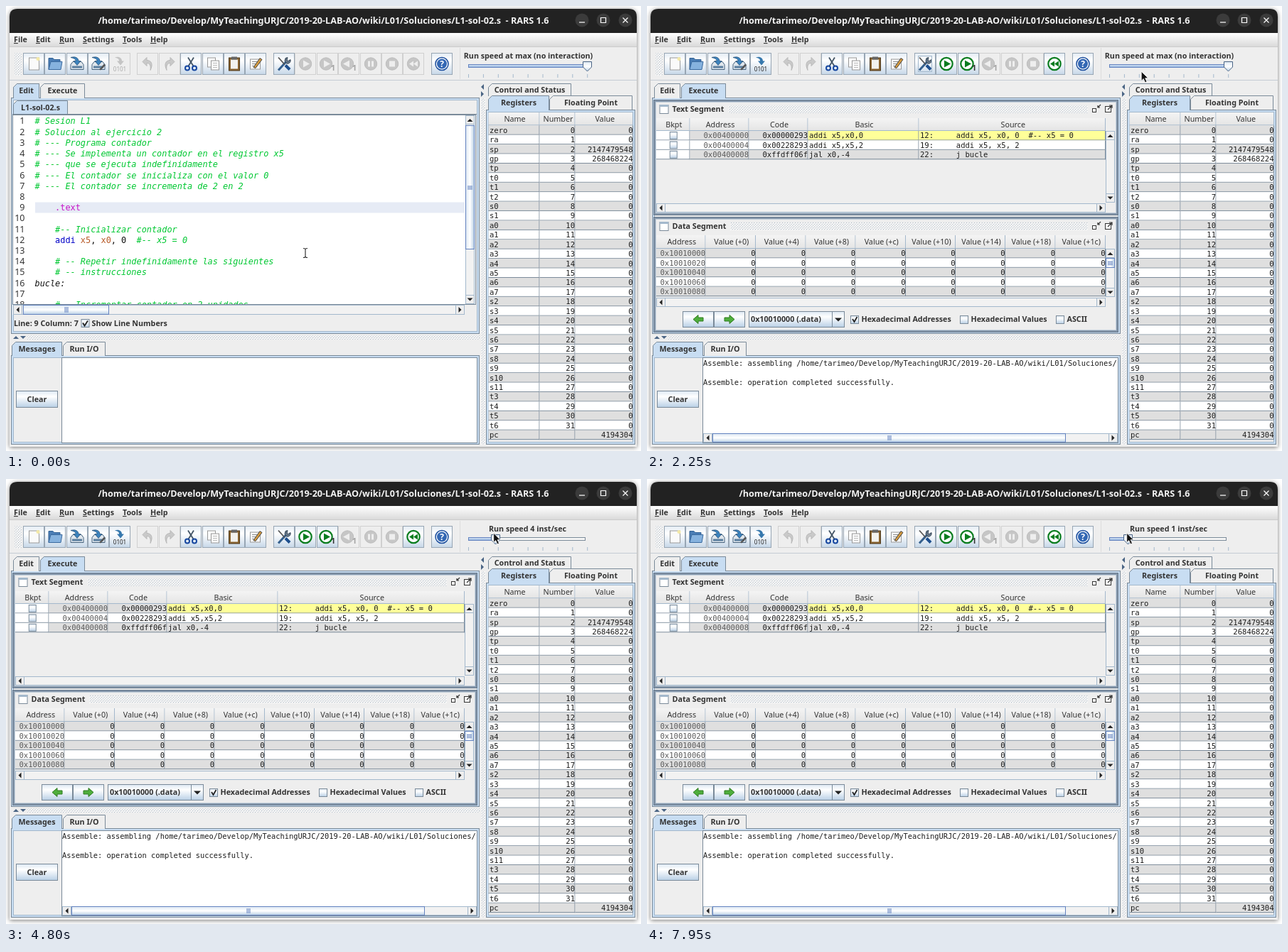
An HTML page that plays this animation: 893x627 px, repeating every 8 s.

```html
<!DOCTYPE html>
<html lang="es">
<head>
<meta charset="utf-8">
<title>RARS</title>
<style>
html, body { margin: 0; width: 100%; height: 100%; overflow: hidden; background: #fff; }
svg { display: block; width: 893px; height: 627px; }
text { font: bold 10.73px "Noto Sans", "Open Sans", sans-serif; fill: #333; white-space: pre; }
.plain { font-weight: normal; }
.mono { font: 10.4px "DejaVu Sans Mono", monospace; fill: #1c1c1c; }
.cell { font-size: 10.55px; }
.dim { fill: #5a5a5a; }
.code { font: italic 11.89px "DejaVu Sans Mono", monospace; fill: #00c832; }
.num { font: 12.5px "Noto Sans", sans-serif; fill: #333; }
.title { font-size: 12.6px; fill: #f4f4f4; }
.mid { text-anchor: middle; }
.end { text-anchor: end; }
.key { text-decoration: underline; }
.kw { fill: #0000c8; font-style: normal; }
.reg { fill: #b85a28; font-style: normal; }
.dir { fill: #c814c8; font-style: normal; }
.blk { fill: #111; }
.up { font-style: normal; }
</style>
</head>
<body>
<svg id="stage" viewBox="0 0 893 627"></svg>
<script>
const LINE = '#7a8a99', SOFT = '#a3b8cc', BLUE = '#c8ddf2', BG = '#eee', GREY = '#dfdfdf';
const stage = document.getElementById('stage');

// Drawing helpers
const box = (x, y, w, h, fill, stroke) => {
  const d = stroke ? .5 : 0;
  return `<rect x="${x + d}" y="${y + d}" width="${w - 2 * d}" height="${h - 2 * d}" fill="${fill}" stroke="${stroke || 'none'}"/>`;
};
const text = (x, y, s, cls = '') => `<text x="${x}" y="${y}" class="${cls}">${s}</text>`;
const path = (d, fill = 'none', stroke = 'none', w = 1) =>
  `<path d="${d}" fill="${fill}" stroke="${stroke}" stroke-width="${w}"/>`;
const circle = (x, y, r, fill, stroke = 'none', w = 1) =>
  `<circle cx="${x}" cy="${y}" r="${r}" fill="${fill}" stroke="${stroke}" stroke-width="${w}"/>`;
const at = (x, y, s, extra = '') => `<g transform="translate(${x} ${y})${extra}">${s}</g>`;
const group = (id, s) => `<g id="${id}">${s}</g>`;
const arrow = (x, y, turn, r = 4, fill = '#222') =>
  at(x, y, path(`M${-r} ${-r / 2}H${r}L0 ${r / 2}Z`, fill), ` rotate(${turn})`);
const bumps = (x, y, w, h) => box(x, y, w, h, 'url(#bump)');
const frame = (x, y, w, h) => box(x, y, w, h, BLUE, LINE) + box(x + 3, y + 3, w - 6, h - 6, BG, SOFT);
const tab = (x, y, w, h, label, on) =>
  path(`M${x + .5} ${y + h}V${y + 5.5}L${x + 5.5} ${y + .5}H${x + w - .5}V${y + h}`, on ? BLUE : BG, LINE) +
  text(x + w / 2, Math.floor(y + h / 2) + 4, label, 'mid');

// Scroll bar with an optional thumb from a to b
function scroll(x, y, w, h, a, b) {
  const up = h > w, s = 13;
  let out = box(x, y, w, h, '#f2f2f2', SOFT);
  out += up
    ? box(x, y, w, s, BG, SOFT) + box(x, y + h - s, w, s, BG, SOFT) +
      arrow(x + w / 2, y + 7, 180) + arrow(x + w / 2, y + h - 6.5, 0)
    : box(x, y, s, h, BG, SOFT) + box(x + w - s, y, s, h, BG, SOFT) +
      arrow(x + 6.5, y + h / 2, 90) + arrow(x + w - 6.5, y + h / 2, -90);
  if (b) {
    out += up ? box(x, a, w, b - a, 'url(#thumbV)', '#6382bf') : box(a, y, b - a, h, 'url(#thumbH)', '#6382bf');
    const m = (a + b) / 2;
    for (const k of [-2, 0, 2])
      out += up ? box(x + 3, m + k, w - 6, 1, '#6382bf') : box(m + k, y + 3, 1, h - 6, '#6382bf');
  }
  return out;
}

// Table: cols are the column edges, fill picks a cell colour, align is l, r, d (dim, right) or c per column
function table(cols, heads, top, first, rows, align, fill) {
  const pitch = 13.42;
  let out = '';
  heads.forEach((s, i) => {
    const w = cols[i + 1] - cols[i];
    out += box(cols[i], top, w, first - top, 'url(#head)') + box(cols[i + 1] - 1, top, 1, first - top, SOFT) +
      text(cols[i] + w / 2 + 1, Math.floor((top + first) / 2) + 4, s, 'plain mid');
  });
  out += box(cols[0], first - 1, cols[heads.length] - cols[0], 1, SOFT);
  rows.forEach((row, r) => row.forEach((s, i) => {
    const y = first + r * pitch, w = cols[i + 1] - cols[i];
    out += box(cols[i], y, w, pitch, fill(r, i)) + box(cols[i], y + pitch - 1, w, 1, LINE) +
      box(cols[i + 1] - 1, y, 1, pitch, LINE);
    if (align[i] == 'c') out += box(cols[i] + w / 2 - 5, y + 1, 11, 11, 'url(#btn)', LINE);
    else if (align[i] == 'l') out += text(cols[i] + 1.5, y + 10.4, s, 'mono cell');
    else out += text(cols[i + 1] - .5, y + 10.4, s, 'mono cell end' + (align[i] == 'd' ? ' dim' : ''));
  }));
  return out;
}
const stripe = r => r % 2 ? '#fff' : GREY;
const check = (x, on, label) =>
  box(x, 436, 12, 12, 'url(#btn)', LINE) + (on ? path(`M${x + 3} 441l2.5 4 4-7`, 'none', '#222', 1.8) : '') +
  text(x + 15.5, 445, label);

// Toolbar icons, centred on 0,0
const sheet = (x, y, w, h) => box(x, y, w, h, '#fafafa', '#999');
const disk = c => path('M-9 1L-6 -3H6L9 1V8H-9Z', '#dfe6ec', '#44617c') + box(-7, 3, 14, 3, '#5b7f9f') +
  path('M-9 -9C-2 -11 2 -8 2 -4H5L0 2L-5 -4H-2C-2 -7 -5 -8 -9 -9Z', c, '#234a70', .7);
const dump = on => path('M-7 -9C-1 -11 3 -8 3 -4H6L1 2L-4 -4H-1C-1 -7 -3 -8 -7 -9Z', on ? '#3678ad' : '#c4c4c4') +
  `<text y="10" class="mid plain" style="font-size:8px;fill:${on ? '#222' : '#aaa'}">0101</text>`;
const turn = path('M-7 -3L-1 -9V-5C6 -5 8 1 4 9C5 2 3 -1 -1 -1V3Z', '#c9c9c9', '#b8b8b8');
const disc = (on, glyph, one) => {
  const c = on ? '#0a7d1f' : '#bdbdbd', x = one ? -2 : 0;
  return circle(x, 0, 8.7, on ? '#fff' : '#c6c6c6', c, on ? 2.2 : 1) + at(x, 0, path(glyph, on ? c : '#eee')) +
    (one ? `<text x="8" y="9.5" class="mid" fill-opacity="${on ? 1 : .4}">1</text>` : '');
};
const play = 'M-3 -5L6 0L-3 5Z', back = 'M3 -5L-6 0L3 5Z', rewind = 'M0 -4V4L-6 0ZM6 -4V4L0 0Z';
const icons = on => [
  [39, 1, sheet(-7, -9, 15, 18) + circle(6, -7, 2.5, '#f3e9a8')],
  [69, 1, path('M-9 -8H-3L-1 -6H7V8H-9Z', '#4a7db5', '#2f5f93') + path('M-6 -3H10L8 8H-9Z', '#86b2de', '#3a6a9f')],
  [100, 1, disk('#3c83bd')],
  [130, 1, disk('#3c83bd') + path('M1 8L8 0L10 2L3 9Z', '#555')],
  [160, on, dump(on)],
  [199, 0, turn],
  [230, 0, at(0, 0, turn, ' scale(-1 1)')],
  [260, 1, path('M-4 -9L4 4M4 -9L-4 4', 'none', '#456', 1.8) + circle(-5, 6, 3, 'none', '#1747a0', 2) + circle(5, 6, 3, 'none', '#1747a0', 2)],
  [291, 1, sheet(-8, -9, 12, 14) + sheet(-3, -5, 12, 14) + path('M0 -1H6M0 2H6M0 5H6', 'none', '#bbb')],
  [321, 1, box(-8, -9, 16, 19, '#8a6430', '#4c391d') + box(-5, -6, 10, 13, '#f2f2ee') + box(-4, -10, 8, 4, '#666')],
  [351, 1, sheet(-8, -7, 15, 15) + path('M-5 -3H3M-5 0H0M-5 3H2', 'none', '#888') + path('M-3 5L6 -8L9 -6L0 6Z', '#d59a3e', '#444')],
  [391, 1, path('M-8 9L3 -3', 'none', '#345f8d', 3) + path('M2 -8L5 -9L4 -5L6 -4L9 -6C10 -2 6 1 3 -1L1 -4Z', '#678', '#345') +
    path('M-8 -9L1 1', 'none', '#555', 1.8) + path('M2 2L8 8', 'none', '#1d4f8e', 4)],
  [421, on, disc(on, play)],
  [452, on, disc(on, play, 1)],
  [482, 0, disc(0, back, 1)],
  [513, 0, disc(0, 'M-4 -4H-1V4H-4ZM1 -4H4V4H1Z')],
  [543, 0, disc(0, 'M-4 -4H4V4H-4Z')],
  [573, on, disc(on, rewind)],
  [613, 1, circle(0, 0, 9, '#fff', '#1d4f9e', 1.5) + circle(0, 0, 7, '#3468b4') +
    '<text y="4.5" class="mid" style="font-size:12px;fill:#fff">?</text>']
].map(([x, live, art]) => box(x - 15, 66, 30, 31, live ? 'url(#tool)' : BG, live ? '#98a6b4' : '#d0d0d0') + at(x, 81.5, art)).join('');

const user = 'tarimeo';
const folder = `/home/${user}/Develop/MyTeachingURJC/2019-20-LAB-AO/wiki/L01/Soluciones/`;
const span = (cls, s) => `<tspan class="${cls}">${s}</tspan>`;
const lines = [
  '# Sesion L1', '# Solucion al ejercicio 2', '# --- Programa contador',
  '# --- Se implementa un contador en el registro x5', '# --- que se ejecuta indefinidamente',
  '# --- El contador se inicializa con el valor 0', '# --- El contador se incrementa de 2 en 2', '',
  '    ' + span('dir', '.text'), '', '    #-- Inicializar contador',
  '    ' + span('kw', 'addi ') + span('reg', 'x5') + span('blk up', ', ') + span('reg', 'x0') + span('blk up', ', 0') + '  #-- x5 = 0',
  '', '    # -- Repetir indefinidamente las siguientes', '    # -- instrucciones', span('blk', 'bucle:'), '',
  '    #-- Incrementar contador en 2 unidades'
];

const defs = () => {
  const grad = (id, stops, flat) => `<linearGradient id="${id}" x2="${flat ? 1 : 0}" y2="${flat ? 0 : 1}">` +
    stops.map((c, i) => `<stop offset="${i / (stops.length - 1)}" stop-color="${c}"/>`).join('') + '</linearGradient>';
  return '<defs>' + grad('btn', ['#dde8f3', '#fff', '#dde8f3', '#b8cfe5']) + grad('tool', ['#e4ecf4', '#fff', '#e4ecf4', '#c6d7e8']) +
    grad('menu', ['#fff', '#dadada']) +
    grad('head', ['#f4f4f4', '#e4e4e4']) + grad('thumbH', ['#dde8f3', '#fff', '#b8cfe5']) +
    grad('thumbV', ['#dde8f3', '#fff', '#b8cfe5'], 1) + grad('fill', ['#dce9f7', '#8fb0dc']) +
    '<pattern id="bump" width="3.6" height="3.6" patternUnits="userSpaceOnUse">' +
    box(0, 0, 1.8, 1.8, '#fff') + box(.9, .9, .9, .9, '#8fa0b0') + box(1.8, 1.8, 1.8, 1.8, '#fff') + box(2.7, 2.7, .9, .9, '#8fa0b0') +
    '</pattern><clipPath id="editClip"><rect x="10" y="154" width="635" height="266"/></clipPath>' +
    '<clipPath id="msgClip"><rect x="79" y="497" width="582" height="104"/></clipPath></defs>';
};

function chrome() {
  const ring = [[810, 'M-4 3H4'], [840, 'M-3.5 -3.5H3.5V3.5H-3.5Z'], [871, 'M-3.5 -3.5L3.5 3.5M3.5 -3.5L-3.5 3.5']];
  const menu = [[11, 'File'], [42, 'Edit'], [75, 'Run'], [108, 'Settings'], [164, 'Tools'], [203, 'Help']];
  return `<path d="M5 621V15Q5 4 16 4H876Q887 4 887 15V621Z" fill="${BG}" style="filter:drop-shadow(0 1px 3px #0008)"/>` +
    path('M5 38V15Q5 4 16 4H876Q887 4 887 15V38Z', '#222') +
    text(446.5, 25, folder + 'L1-sol-02.s  - RARS 1.6', 'title mid') +
    ring.map(([x, d]) => circle(x, 20, 9.5, '#3b3b3b') + at(x, 20, path(d, 'none', '#fff', 1.2))).join('') +
    box(5, 38, 882, 19, 'url(#menu)') + box(5, 57, 882, 1, '#ccc') +
    menu.map(([x, s]) => text(x, 51, span('key', s[0]) + s.slice(1))).join('') +
    bumps(12, 66, 10, 32) + box(638, 59, 1, 44, '#ddd') + box(5, 104, 882, 1, '#c4ccd4');
}

function editor() {
  return tab(10, 133, 77, 20, 'L1-sol-02.s', 1) + box(9, 152, 653, 1, LINE) +
    box(9, 153, 652, 268, '#fff', LINE) + box(41, 276.5, 604, 15, '#e6ebf5') +
    '<g clip-path="url(#editClip)">' + lines.map((s, i) => {
      const y = 166.4 + i * 15.22;
      return text(26.5, y, i + 1, 'num end') + text(40.5, y, s, 'code');
    }).join('') + '</g>' +
    group('caret', box(105, 277, 1, 14, '#222')) +
    scroll(646, 154, 13, 266, 168, 343) + box(9, 421, 652, 14, BG) + scroll(10, 421, 635, 14, 24, 145) +
    text(11, 451, 'Line: 9 Column: 7') + box(105.5, 441, 12, 12, 'url(#btn)', LINE) +
    path('M108 446.5l2.5 4 4.5-7', 'none', '#222', 1.8) + text(120.5, 451, 'Show Line Numbers');
}

const inner = (y, h, label, x) =>
  box(9, y, 654, h, '#8496aa', '#66788c') + box(12, y + 3, 648, h - 6, BG, '#c4d0dc') +
  box(17.5, y + 7, 13, 13, '#fff', LINE) + box(18, y + 7, 12, 3, SOFT) + text(35.5, y + 17, label) +
  bumps(x, y + 8, 620 - x, 11) +
  box(626, y + 12, 6, 6, '#fff', '#333') + path(`M638 ${y + 7}l-4 4m0 -3v3h3`, 'none', '#333', 1.2) +
  box(644, y + 9, 9, 9, '#fff', '#333') + path(`M648 ${y + 14}l6 -6m-4 0h4v4`, 'none', '#333', 1.2);

function execute() {
  const code = [
    ['', '0x00400000', '0x00000293', 'addi x5,x0,0', '12:     addi x5, x0, 0  #-- x5 = 0'],
    ['', '0x00400004', '0x00228293', 'addi x5,x5,2', '19:     addi x5, x5, 2'],
    ['', '0x00400008', '0xffdff06f', 'jal x0,-4', '22:     j bucle']
  ];
  const data = [0, 2, 4, 6, 8].map(n => [`0x100100${n}0`, ...Array(8).fill('0')]);
  const offsets = ['0', '4', '8', 'c', '10', '14', '18', '1c'].map(s => `Value (+${s})`);
  const green = (x, flip) => box(x, 430, 44, 23, 'url(#btn)', LINE) +
    at(x + 22, 441.5, path('M-7 0L0 -6V-2.5H7V2.5H0V6Z', '#4fae3c', '#2c7a20'), ` scale(${flip} 1)`);
  return inner(132, 163, 'Text Segment', 115) +
    table([13, 60.5, 143.5, 226.5, 382.5, 645], ['Bkpt', 'Address', 'Code', 'Basic', 'Source'], 158, 176, code, 'cdrll',
      (r, i) => r == 0 && i > 2 ? '#ffff99' : i == 0 ? '#fff' : stripe(r)) +
    scroll(645, 176, 13, 101) + scroll(13, 278, 632, 13) +
    inner(297, 163, 'Data Segment', 117) +
    table([13, 82.5, 153, 223.5, 293.5, 364, 434, 504, 574.5, 645], ['Address', ...offsets], 323, 342, data, 'drrrrrrrr', stripe) +
    scroll(645, 342, 13, 68, 355, 369) + scroll(13, 411, 632, 13) +
    green(50, 1) + green(94, -1) +
    box(143, 430, 135, 23, 'url(#btn)', LINE) + box(260, 430, 1, 23, LINE) + text(146, 445, '0x10010000 (.data)') + arrow(269, 442, 0, 5) +
    check(286, 1, 'Hexadecimal Addresses') + check(440, 0, 'Hexadecimal Values') + check(575, 0, 'ASCII') +
    '<g clip-path="url(#msgClip)">' + text(79, 507, 'Assemble: assembling ' + folder + 'L1-sol-02.s', 'mono') +
    text(79, 534, 'Assemble: operation completed successfully.', 'mono') + '</g>' +
    scroll(79, 602, 583, 13, 92, 589);
}

const editTab = on => tab(10, 109, 37, 21, 'Edit', on);
const execTab = on => tab(48, 109, 63, 21, 'Execute', on);

function panels() {
  return frame(7, 129, 659, 333) + editTab() + execTab() +
    bumps(30, 464, 636, 6) + arrow(14, 467, 180, 4, '#4a6484') + arrow(24, 467, 0, 4, '#4a6484') +
    bumps(668, 130, 6, 488) + arrow(670, 114, 90, 4, '#4a6484') + arrow(670, 124, -90, 4, '#4a6484') +
    frame(7, 492, 659, 126) +
    tab(8, 473, 71, 20, 'Messages', 1) + tab(80, 473, 60, 20, 'Run I/O') +
    box(14, 542, 59, 24, 'url(#btn)', LINE) + text(43.5, 558, 'Clear', 'mid') + box(78, 495, 585, 121, '#fff', LINE);
}

function registers() {
  const run = (c, a, b) => Array.from({ length: b - a + 1 }, (_, i) => c + (a + i));
  const names = ['zero', 'ra', 'sp', 'gp', 'tp', ...run('t', 0, 2), 's0', 's1', ...run('a', 0, 7), ...run('s', 2, 11), ...run('t', 3, 6), 'pc'];
  const value = { sp: 2147479548, gp: 268468224, pc: 4194304 };
  const rows = names.map((s, i) => [s, s == 'pc' ? '' : i, value[s] || 0]);
  return frame(675, 146, 210, 472) +
    tab(678, 109, 117, 18, 'Control and Status') + tab(764, 126, 117, 20, 'Floating Point') + tab(678, 126, 86, 21, 'Registers', 1) +
    table([678.5, 750.5, 800.5, 882], ['Name', 'Number', 'Value'], 150, 168.3, rows, 'lrr', stripe);
}

const slider = () => '<text id="speed" y="74" class="mid"></text>' +
  `<rect id="track" x="650.5" y="82.5" height="4" fill="#f6f6f6" stroke="${LINE}"/>` +
  `<rect id="done" x="650.5" y="82.5" height="4" fill="url(#fill)" stroke="#6382bf"/>` +
  Array.from({ length: 9 }, (_, i) => box(650 + i * 20.9, 96, 1, 5, SOFT)).join('') +
  group('knob', path('M-6 -6.5H6V1L0 7L-6 1Z', 'url(#thumbH)', '#4a6484'));

const beam = 'M-3 -6.5Q0 -6.5 0 -5V5Q0 6.5 -3 6.5M3 -6.5Q0 -6.5 0 -5V5Q0 6.5 3 6.5';

stage.innerHTML = defs() + chrome() + group('off', icons(0)) + group('on', icons(1)) +
  group('hover', box(377, 67, 28, 29, 'none', '#8fb0dc')) +
  group('focus', box(381, 70, 20, 23, 'none', SOFT)) +
  group('press', box(376, 66, 30, 31, '#7da5d455', '#5a7391')) +
  panels() + group('edit', editTab(1) + editor()) +
  group('exec', execTab(1) + execute()) + registers() + slider() +
  group('beam', path(beam, 'none', '#fff', 2.6) + path(beam, 'none', '#222', 1.1)) +
  group('mouse', path('M-.8 -.8V12.4L2.2 9.6L4.5 14.8L6.9 13.7L4.7 8.7H8.7Z', '#111', '#fff', .8));

// time, pointer x, pointer y, knob x
const keys = [
  [150, 421, 348, 817.5], [1000, 395, 90, 817.5], [1150, 393, 86, 817.5], [1900, 393, 86, 817.5],
  [2250, 696, 93, 817.5], [2750, 803, 88, 817.5], [2950, 814, 85, 817.5], [3100, 814, 85, 817.5],
  [3400, 798.5, 91, 803], [3950, 781, 78, 785], [4800, 686.5, 77, 688.5], [4900, 684.5, 77, 686],
  [5000, 684.5, 77, 686], [5200, 682.5, 77, 684], [5450, 682.5, 77, 684], [5550, 681.5, 77, 683],
  [6850, 681.5, 77, 683], [6900, 680.5, 77, 682.3], [7050, 680.5, 77, 682.3], [7100, 679.5, 77, 681.6],
  [7200, 679.5, 77, 681.6], [7550, 674, 77, 675.5], [7750, 674, 77, 675.5], [7950, 675.5, 77, 676.5]
];

// Monotone cubic through one column of the keys
function track(t, c) {
  const n = keys.length - 1;
  if (t <= keys[0][0]) return keys[0][c];
  if (t >= keys[n][0]) return keys[n][c];
  const i = keys.findIndex(k => k[0] > t) - 1;
  const slope = j => j < 0 || j >= n ? 0 : (keys[j + 1][c] - keys[j][c]) / (keys[j + 1][0] - keys[j][0]);
  const tangent = j => {
    const a = slope(j - 1), b = slope(j);
    return a * b > 0 ? 2 * a * b / (a + b) : 0;
  };
  const h = keys[i + 1][0] - keys[i][0], u = (t - keys[i][0]) / h, v = 1 - u;
  return keys[i][c] * v * v * (1 + 2 * u) + keys[i + 1][c] * u * u * (3 - 2 * u) +
    h * u * v * (tangent(i) * v - tangent(i + 1) * u);
}

const el = id => document.getElementById(id);
const show = (id, on) => el(id).style.display = on ? '' : 'none';
const move = (id, x, y) => el(id).setAttribute('transform', `translate(${x.toFixed(2)} ${y.toFixed(2)})`);

function draw() {
  const t = Math.floor(performance.now() % 8000 / 50) * 50;
  const x = track(t, 1), y = track(t, 2), knob = track(t, 3);
  const done = t >= 1500, typing = y > 155;
  const over = x > 376 && x < 406 && y > 66 && y < 97;
  show('off', !done); show('edit', !done);
  show('on', done); show('exec', done);
  show('caret', t >= 500 && t < 1000);
  show('hover', over);
  show('press', t >= 1150 && !done);
  show('focus', t >= 1150 && t < 3150);
  show('beam', typing); show('mouse', !typing);
  move('beam', x, y); move('mouse', x, y); move('knob', knob, 85);

  const step = Math.round((knob - 650) / 4.18), max = step >= 36;
  el('speed').textContent = max ? 'Run speed at max (no interaction)' : `Run speed ${step - 5} inst/sec`;
  el('speed').setAttribute('x', max ? 734.5 : 733.5);
  el('track').setAttribute('width', max ? 166 : 164);
  el('done').setAttribute('width', knob - 650.5);
  requestAnimationFrame(draw);
}
draw();
</script>
</body>
</html>
```
